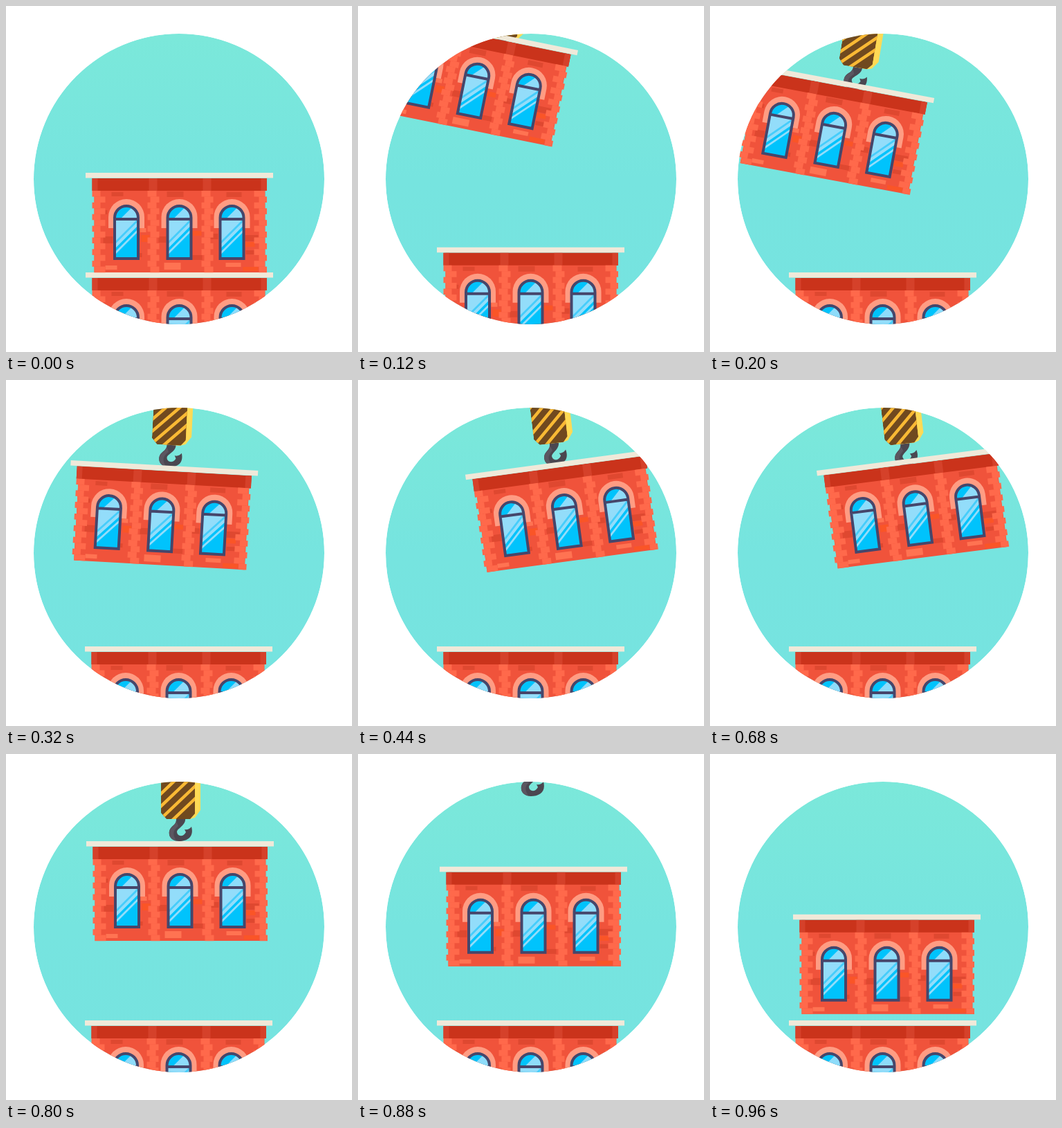
An HTML page for the animation above (1 s loop, 500 by 500 pixels).

```html
<!DOCTYPE html>
<html lang="en">
<head>
<meta charset="utf-8">
<title>Building floors</title>
<style>
html, body { margin: 0; width: 100%; height: 100%; overflow: hidden; background: #fff; }
svg { display: block; width: 100vw; height: 100vh; }
</style>
</head>
<body>
<svg viewBox="0 0 500 500">
  <defs>
    <linearGradient id="sky" x2="0" y2="1">
      <stop offset="0" stop-color="#7be8da"/>
      <stop offset=".5" stop-color="#76e4df"/>
      <stop offset="1" stop-color="#76e3e0"/>
    </linearGradient>
    <clipPath id="disc"><circle cx="250" cy="250" r="210"/></clipPath>
    <clipPath id="stripeArea"><path d="M-28-130H21V-7L14 1H-20L-28-8Z"/></clipPath>
    <clipPath id="glass"><path d="M-17 78V19A17 17 0 0 1 17 19V78Z"/></clipPath>

    <!-- origin: top middle of the pink arch's inner edge -->
    <g id="window">
      <path d="M-26 34V18A26 26 0 0 1 26 18V34Z" fill="#ff9c83"/>
      <path d="M-19 34H19V80H-19Z" fill="#f0533b"/>
      <g clip-path="url(#glass)">
        <path d="M-19 0H19V80H-19Z" fill="#00c3fc"/>
        <path d="M-9 21L11 1H19V21Z" fill="#8edcfa"/>
        <path d="M-17 22H17V30L-17 64Z" fill="#93ddfa"/>
        <path d="M-17 54L15 22H17V24L-17 58Z" fill="#46cdfb"/>
        <path d="M-17 69L17 35V39L-17 73Z" fill="#93ddfa"/>
      </g>
      <path d="M-17 78V19A17 17 0 0 1 17 19V78ZM-17 21H17" fill="none" stroke="#46466b" stroke-width="4"/>
    </g>

    <!-- origin: middle of the cornice's top edge -->
    <g id="floor"></g>

    <!-- origin: middle of the pulley's bottom edge -->
    <g id="crane">
      <path d="M-6-2H7C9 10-3 13-5 19C-5 26 4 28 8 20L6 16C10 17 14 15 16 12C20 27 10 33-2 33C-16 33-19 21-14 14C-10 9-5 8-6-2Z" fill="#4b4750"/>
      <path d="M-6 4C-7 12-17 13-16 22C-16 28-11 31-6 32C-13 21-9 17-3 11Z" fill="#5b5660"/>
      <path d="M-10-130H29V-12L21-1L14 1H-10Z" fill="#ffda55"/>
      <path d="M12-130H21V-7L14 1H8Z" fill="#f2b43c"/>
      <g clip-path="url(#stripeArea)">
        <path d="M-28-130H21V2H-28Z" fill="#70491f"/>
        <path id="stripes" stroke="#f9b934" stroke-width="4.5"/>
      </g>
    </g>
  </defs>

  <g clip-path="url(#disc)">
    <circle cx="250" cy="250" r="210" fill="url(#sky)"/>
    <use id="hook" href="#crane"/>
    <use id="lower" href="#floor"/>
    <use id="upper" href="#floor"/>
    <use id="load" href="#floor"/>
  </g>
</svg>
<script>
const LOOP = 1000, STEP = 40, STOREY = 144;
const $ = id => document.getElementById(id);

const rect = (x, y, w, h, fill) =>
  `<rect x="${x}" y="${y}" width="${w}" height="${h}" fill="${fill}"/>`;

// Column of alternating wide and narrow stones
function quoins(left, right, jagLeft, jagRight) {
  let out = '';
  for (let i = 0; i < 14; i++) {
    const l = left - (i % 2 ? 0 : jagLeft);
    const r = right + (i % 2 ? jagRight : 0);
    out += rect(l, 26 + i * 8.43, r - l, 8.6, '#ff694b');
  }
  return out;
}

function buildFloor() {
  const dark = '#df4830', light = '#ff7352', warm = '#fa5527';
  const bricks = [
    [-18, 27, 24, 8, dark], [-98, 28, 17, 6, dark], [68, 28, 22, 7, dark],
    [-119, 54, 15, 6, dark], [-110, 92, 14, 10, dark], [-30, 92, 12, 9, dark],
    [92, 90, 22, 9, dark], [-76, 116, 22, 6, dark], [15, 119, 18, 7, dark],
    [96, 112, 16, 6, dark], [42, 88, 14, 8, dark],
    [-22, 130, 24, 10, light], [-107, 134, 17, 6, light], [67, 130, 22, 6, light],
    [-57, 80, 9, 6, light], [-55, 90, 12, 10, warm], [18, 84, 14, 7, warm],
    [95, 100, 14, 7, warm], [92, 136, 22, 6, warm]
  ];
  const pillars = [[-126, 8], [-44, 12], [34, 12], [118, 8.5]];
  return rect(-123, 8, 247, STOREY - 8, '#f0533b')
    + rect(-126, 8, 252.5, 18, '#ca331b')
    + pillars.map(([x, w]) => rect(x, 8, w, 18, '#d5412a')).join('')
    + bricks.map(b => rect(...b)).join('')
    + quoins(-123, -114, 3, 7) + quoins(-42, -33, 4, 4)
    + quoins(36, 45, 4, 4) + quoins(115, 123.5, 7, 3)
    + [-76.5, 0, 76].map(x => `<use href="#window" x="${x}" y="46"/>`).join('')
    + rect(-135.5, 0, 271, 7.5, '#f0e9d9');
}

$('floor').innerHTML = buildFloor();
$('stripes').setAttribute('d',
  Array.from({ length: 12 }, (_, i) => `M-34 ${24 - i * 18}l60-57`).join(''));

// Smooth curve through [time, value] keys without overshoot
function track(keys, t) {
  const last = keys.length - 1;
  if (t <= keys[0][0]) return keys[0][1];
  if (t >= keys[last][0]) return keys[last][1];
  const slope = i => (keys[i + 1][1] - keys[i][1]) / (keys[i + 1][0] - keys[i][0]);
  const tangent = i => {
    if (i === 0 || i === last) return 0;
    const a = slope(i - 1), b = slope(i);
    return a * b > 0 ? 2 * a * b / (a + b) : 0;
  };
  const i = keys.findIndex(k => k[0] > t) - 1;
  const [t0, v0] = keys[i], [t1, v1] = keys[i + 1];
  const d = t1 - t0, u = (t - t0) / d, w = 1 - u;
  return v0 * (1 + 2 * u) * w * w + v1 * u * u * (3 - 2 * u)
    + d * u * w * (tangent(i) * w - tangent(i + 1) * u);
}

function easeInOut(p) {
  p = Math.min(1, Math.max(0, p));
  return p < .5 ? 2 * p * p : 1 - 2 * (1 - p) ** 2;
}

const swing = [[0, 12], [120, 11.5], [200, 10.6], [320, 3.2], [520, -12.5], [560, -13], [680, -7.3], [800, 0]];
const loadX = [[0, 178], [120, 185.2], [200, 191], [320, 229], [520, 316.3], [560, 319], [680, 288.4],
  [800, 251.5], [960, 255.5], [1000, 250.5]];
const loadY = [[0, -210], [120, 37], [200, 108], [320, 123.5], [360, 125.5], [420, 121], [520, 107.7],
  [560, 106], [680, 113.8], [800, 126]];
const hookX = [[0, 205], [120, 208], [200, 213], [320, 238.5], [520, 303], [560, 305], [680, 281], [800, 252]];
const hookY = [[0, -91], [120, 47], [200, 88], [320, 93], [520, 89], [560, 89], [680, 91], [800, 93]];

function place(id, x, y, angle = 0) {
  $(id).setAttribute('transform', `translate(${x.toFixed(2)} ${y.toFixed(2)}) rotate(${angle.toFixed(2)})`);
}

function draw(t) {
  const sink = STOREY * easeInOut(t / 186);
  const baseX = 249.5 + Math.max(0, 1 - t / 120);
  place('upper', baseX, 241 + sink);
  place('lower', baseX, 385 + sink);

  const angle = track(swing, t);
  const drop = 115 * easeInOut((t - 800) / 200);
  place('load', track(loadX, t), track(loadY, t) + drop, angle);

  const lift = 130 * easeInOut((t - 800) / 160);
  place('hook', track(hookX, t), track(hookY, t) - lift, angle * .9);
}

function tick(now) {
  draw(Math.floor(now % LOOP / STEP) * STEP);
  requestAnimationFrame(tick);
}
draw(0);
requestAnimationFrame(tick);
</script>
</body>
</html>
```
